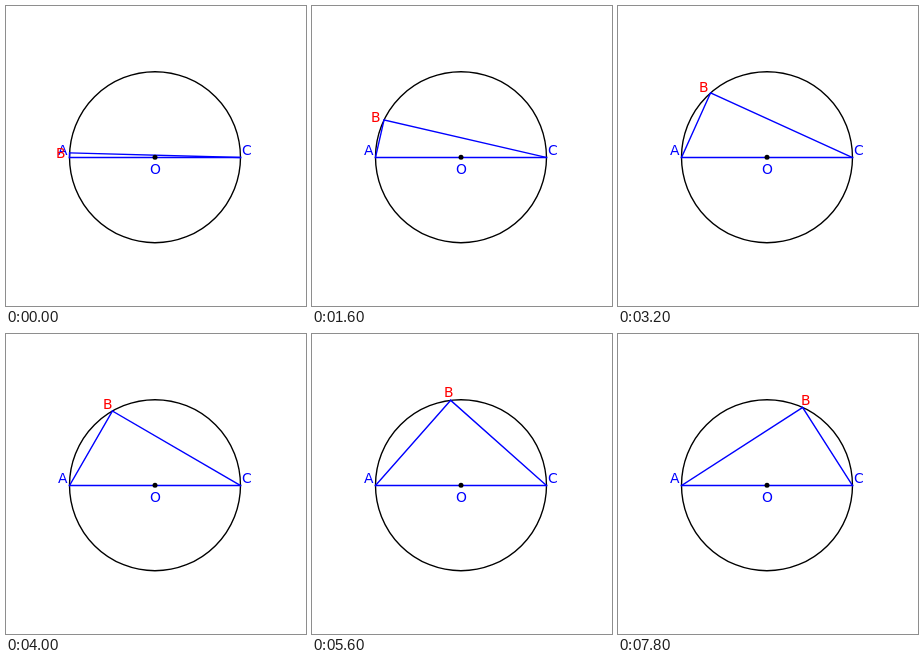
Animation of 300 by 300 pixels, one loop 8000 ms. Source, as an HTML page with a canvas:

```html
<!DOCTYPE html>
<html lang="en">
<head>
<meta charset="utf-8">
<title>Triangle in a semicircle</title>
<style>
html, body { margin: 0; width: 100%; height: 100%; overflow: hidden; background: #fff; }
canvas { display: block; width: 300px; height: 300px; }
</style>
</head>
<body>
<canvas id="stage" width="300" height="300"></canvas>
<script>
const ctx = document.getElementById('stage').getContext('2d');
const LOOP = 8000, STEP = 200, TURN = 0.05;
const O = { x: 149, y: 151.2 }, R = 85.5;
const A = { x: O.x - R, y: 151.5 }, C = { x: O.x + R, y: 151.5 };
const BLUE = '#0000ff', RED = '#ff0000';

// Point on a circle around O, the angle running clockwise from A.
function around(angle, radius) {
  return { x: O.x - radius * Math.cos(angle), y: O.y - radius * Math.sin(angle) };
}

function line(p, q) {
  ctx.beginPath();
  ctx.moveTo(p.x, p.y);
  ctx.lineTo(q.x, q.y);
  ctx.stroke();
}

function label(text, x, y, color) {
  ctx.fillStyle = color;
  ctx.fillText(text, x, y);
}

function draw(time) {
  const step = Math.floor((time % LOOP) / STEP);
  const angle = (step + 1) * TURN;
  const B = around(angle, R);
  const tag = around(angle, R * 1.1);

  ctx.fillStyle = '#fff';
  ctx.fillRect(0, 0, 300, 300);
  ctx.lineWidth = 1.39;
  ctx.lineJoin = 'round';
  ctx.lineCap = 'square';

  ctx.strokeStyle = '#000';
  ctx.beginPath();
  ctx.arc(O.x, O.y, R, 0, Math.PI * 2);
  ctx.stroke();

  ctx.strokeStyle = BLUE;
  line(A, B);
  line(B, C);
  line(C, A);

  ctx.fillStyle = '#000';
  ctx.beginPath();
  ctx.arc(O.x, O.y, 2.5, 0, Math.PI * 2);
  ctx.fill();

  ctx.font = '13.89px "DejaVu Sans", sans-serif';
  label('A', 52, 149, BLUE);
  label('C', 236, 149, BLUE);
  label('O', 144, 168, BLUE);
  // Whole-pixel label positions
  label('B', Math.floor(tag.x - 5), Math.round(tag.y + 5.35), RED);
}

const start = performance.now();
function tick() {
  draw(performance.now() - start);
  requestAnimationFrame(tick);
}
tick();
</script>
</body>
</html>
```
